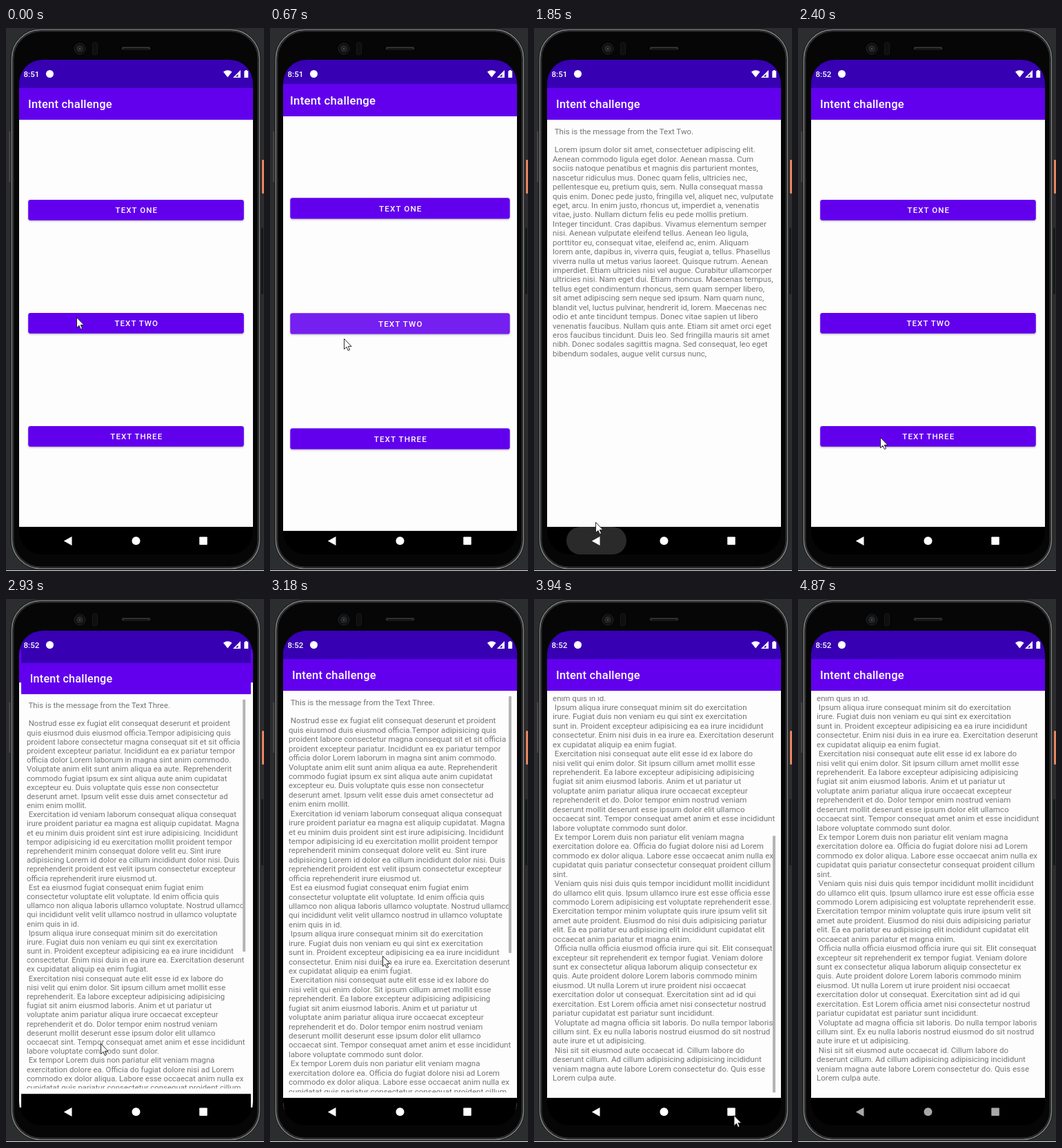
Animation, 374 px wide and 787 px high, one loop 4.97 s. Source, as an HTML page:

```html
<!DOCTYPE html>
<html lang="en">
<head>
<meta charset="utf-8">
<title>Intent challenge</title>
<style>
  html, body { margin: 0; width: 100%; height: 100%; overflow: hidden; background: #2c2d2f; }
  svg { display: block; width: 100%; height: 100%; }
  text { font-family: Roboto, sans-serif; white-space: pre; }
  .body { font-size: 11.57px; fill: #757575; }
  .title { font-size: 16.5px; font-weight: 500; letter-spacing: .22px; fill: #fff; }
  .label { font-size: 11.55px; font-weight: 500; letter-spacing: 1.03px; fill: #fff; text-anchor: middle; }
  .clock { font-size: 11.6px; font-weight: 500; fill: #fff; }
</style>
</head>
<body>
<svg viewBox="0 0 374 787">
  <defs>
    <clipPath id="screen"><rect x="19" y="46" width="339" height="717" rx="34"/></clipPath>
    <clipPath id="view"><rect x="19" y="141" width="339" height="574"/></clipPath>
    <filter id="lift" x="-5%" y="-30%" width="110%" height="170%">
      <feDropShadow dx="0" dy="1.2" stdDeviation=".9" flood-color="#000" flood-opacity=".28"/>
    </filter>
    <g id="chrome">
      <rect x="19" y="132" width="339" height="592" fill="#fdfdfd"/>
      <rect x="19" y="46" width="339" height="42" fill="#3700b3"/>
      <rect x="19" y="87" width="339" height="46" fill="#6200ee"/>
      <rect x="19" y="723" width="339" height="40"/>
      <text class="title" x="32" y="116">Intent challenge</text>
    </g>
  </defs>

  <rect width="374" height="787" fill="#2c2d2f"/>
  <rect x="371" y="191" width="3" height="49" rx="1" fill="#e5845e"/>
  <rect x="370" y="290" width="3" height="96" rx="1" fill="#17181a"/>
  <rect x="4.5" y="150" width="2" height="73" fill="#4a4b4d"/>
  <rect y="786" width="374" height="1" fill="#dcdcdc"/>
  <g fill="none">
    <rect x="7" y="1" width="362" height="784" rx="44" fill="#060606" stroke="#1a1b1c"/>
    <rect x="8.5" y="2.5" width="359" height="781" rx="42" stroke="#858688" stroke-width="1.6"/>
    <rect x="10.500" y="4.500" width="355" height="777" rx="40" stroke="#2c2d2e" stroke-width="2"/>
    <circle cx="107" cy="30" r="8" fill="#101112" stroke="#1e1f20"/>
    <circle cx="107" cy="30" r="4" fill="#1d1f22" stroke="#34363a"/>
    <circle cx="107" cy="30" r="1.2" fill="#4b4d52"/>
    <rect x="125.500" y="21" width="7" height="18" rx="3" fill="#0e0e0f" stroke="#18191a"/>
    <path d="M170 29.500H207" stroke="#3a3a3b" stroke-width="4" stroke-linecap="round"/>
    <path d="M171 30.500H206" stroke="#161616" stroke-width="3" stroke-linecap="round"/>
  </g>

  <g clip-path="url(#screen)">
    <rect x="19" y="46" width="339" height="717"/>
    <g id="menu"><use href="#chrome"/></g>
    <g id="reader">
      <use href="#chrome"/>
      <g clip-path="url(#view)"><g id="short"></g><g id="long"></g></g>
      <rect id="bar" x="346" width="4" height="372" fill="#b4b4b4"/>
    </g>

    <text id="clock" class="clock" x="25.500" y="71"></text>
    <g fill="#fff">
      <circle cx="63.500" cy="66.500" r="5.500"/>
      <path d="M315 63.500Q321.300 59 327.600 63.500L321.300 71.500Z"/>
      <path d="M340 61V72H329Z"/>
      <path d="M336.500 67V70.600H332.800Z" fill="#3700b3"/>
      <path d="M345.300 62.200H347V61H349.500V62.200H351.200V72H345.300Z"/>
    </g>
    <rect id="pill" y="723" height="40" rx="20" fill="#2a2a2a"/>
    <g id="nav" fill="#fff">
      <path d="M83.800 743.400L95.500 736.900V749.900Z"/>
      <circle cx="188.500" cy="743.300" r="6"/>
      <rect x="280.300" y="737.500" width="11.500" height="11.500" rx=".8"/>
    </g>
  </g>
  <path id="cursor" d="M.5 .5V15.500L4 12.300L6.300 17.500L8.600 16.500L6.300 11.400H11Z" fill="#fff" stroke="#15151c" stroke-width=".9"/>
</svg>

<script>
const LOOP = 4970, OPEN_A = 635, CLOSE = 1887, OPEN_B = 2792;
const LINE = 13.43, MID_X = 188.5, MID_Y = 404.5;

// The screen is refreshed only at these moments (ms).
const TICKS = [0, 130, 280, 400, 520, 670, 790, 910, 1060, 1210, 1330, 1730, 1850, 2000, 2140, 2260,
  2400, 2680, 2800, 2930, 3050, 3180, 3430, 3550, 3680, 3820, 3940, 4090, 4240, 4390, 4630, 4870];

// [time, x, y]
const POINTER = [[0, 102, 419], [130, 104, 421], [520, 104, 421], [670, 107, 450], [910, 122, 548],
  [1060, 110, 650], [1330, 88, 747], [1730, 88, 747], [1850, 89, 716], [2000, 96, 680], [2260, 116, 598],
  [2400, 119, 593], [2680, 119, 593], [2930, 137, 644], [3050, 146, 620], [3180, 163, 517],
  [3430, 185, 405], [3550, 190, 330], [3680, 192, 305], [3940, 289.5, 748], [4090, 290, 778]];
const SCROLL = [[3180, 0], [3430, 104.6], [3550, 215], [3680, 328.3]];

const SHORT = ` This is the message from the Text Two.

 Lorem ipsum dolor sit amet, consectetuer adipiscing elit.
Aenean commodo ligula eget dolor. Aenean massa. Cum
sociis natoque penatibus et magnis dis parturient montes,
nascetur ridiculus mus. Donec quam felis, ultricies nec,
pellentesque eu, pretium quis, sem. Nulla consequat massa
quis enim. Donec pede justo, fringilla vel, aliquet nec, vulputate
eget, arcu. In enim justo, rhoncus ut, imperdiet a, venenatis
vitae, justo. Nullam dictum felis eu pede mollis pretium.
Integer tincidunt. Cras dapibus. Vivamus elementum semper
nisi. Aenean vulputate eleifend tellus. Aenean leo ligula,
porttitor eu, consequat vitae, eleifend ac, enim. Aliquam
lorem ante, dapibus in, viverra quis, feugiat a, tellus. Phasellus
viverra nulla ut metus varius laoreet. Quisque rutrum. Aenean
imperdiet. Etiam ultricies nisi vel augue. Curabitur ullamcorper
ultricies nisi. Nam eget dui. Etiam rhoncus. Maecenas tempus,
tellus eget condimentum rhoncus, sem quam semper libero,
sit amet adipiscing sem neque sed ipsum. Nam quam nunc,
blandit vel, luctus pulvinar, hendrerit id, lorem. Maecenas nec
odio et ante tincidunt tempus. Donec vitae sapien ut libero
venenatis faucibus. Nullam quis ante. Etiam sit amet orci eget
eros faucibus tincidunt. Duis leo. Sed fringilla mauris sit amet
nibh. Donec sodales sagittis magna. Sed consequat, leo eget
bibendum sodales, augue velit cursus nunc,`;

const LONG = ` This is the message from the Text Three.

 Nostrud esse ex fugiat elit consequat deserunt et proident
quis eiusmod duis eiusmod officia.Tempor adipisicing quis
proident labore consectetur magna consequat sit et sit officia
proident excepteur pariatur. Incididunt ea ex pariatur tempor
officia dolor Lorem laborum in magna sint anim commodo.
Voluptate anim elit sunt anim aliqua ea aute. Reprehenderit
commodo fugiat ipsum ex sint aliqua aute anim cupidatat
excepteur eu. Duis voluptate quis esse non consectetur
deserunt amet. Ipsum velit esse duis amet consectetur ad
enim enim mollit.
 Exercitation id veniam laborum consequat aliqua consequat
irure proident pariatur ea magna est aliquip cupidatat. Magna
et eu minim duis proident sint est irure adipisicing. Incididunt
tempor adipisicing id eu exercitation mollit proident tempor
reprehenderit minim consequat dolore velit eu. Sint irure
adipisicing Lorem id dolor ea cillum incididunt dolor nisi. Duis
reprehenderit proident est velit ipsum consectetur excepteur
officia reprehenderit irure eiusmod ut.
 Est ea eiusmod fugiat consequat enim fugiat enim
consectetur voluptate elit voluptate. Id enim officia quis
ullamco non aliqua laboris ullamco voluptate. Nostrud ullamco
qui incididunt velit velit ullamco nostrud in ullamco voluptate
enim quis in id.
 Ipsum aliqua irure consequat minim sit do exercitation
irure. Fugiat duis non veniam eu qui sint ex exercitation
sunt in. Proident excepteur adipisicing ea ea irure incididunt
consectetur. Enim nisi duis in ea irure ea. Exercitation deserunt
ex cupidatat aliquip ea enim fugiat.
 Exercitation nisi consequat aute elit esse id ex labore do
nisi velit qui enim dolor. Sit ipsum cillum amet mollit esse
reprehenderit. Ea labore excepteur adipisicing adipisicing
fugiat sit anim eiusmod laboris. Anim et ut pariatur ut
voluptate anim pariatur aliqua irure occaecat excepteur
reprehenderit et do. Dolor tempor enim nostrud veniam
deserunt mollit deserunt esse ipsum dolor elit ullamco
occaecat sint. Tempor consequat amet anim et esse incididunt
labore voluptate commodo sunt dolor.
 Ex tempor Lorem duis non pariatur elit veniam magna
exercitation dolore ea. Officia do fugiat dolore nisi ad Lorem
commodo ex dolor aliqua. Labore esse occaecat anim nulla ex
cupidatat quis pariatur consectetur consequat proident cillum
sint.
 Veniam quis nisi duis quis tempor incididunt mollit incididunt
do ullamco elit quis. Ipsum ullamco irure est esse officia esse
commodo Lorem adipisicing est voluptate reprehenderit esse.
Exercitation tempor minim voluptate quis irure ipsum velit sit
amet aute proident. Eiusmod do nisi duis adipisicing pariatur
elit. Ea ea pariatur eu adipisicing elit incididunt cupidatat elit
occaecat anim pariatur et magna enim.
 Officia nulla officia eiusmod officia irure qui sit. Elit consequat
excepteur sit reprehenderit ex tempor fugiat. Veniam dolore
sunt ex consectetur aliqua laborum aliquip consectetur ex
quis. Aute proident dolore Lorem laboris commodo minim
eiusmod. Ut nulla Lorem ut irure proident nisi occaecat
exercitation dolor ut consequat. Exercitation sint ad id qui
exercitation. Est Lorem officia amet nisi consectetur nostrud
pariatur cupidatat est pariatur sunt incididunt.
 Voluptate ad magna officia sit laboris. Do nulla tempor laboris
cillum sint. Ex eu nulla laboris nostrud eiusmod do sit nostrud
aute irure et ut adipisicing.
 Nisi sit sit eiusmod aute occaecat id. Cillum labore do
deserunt cillum. Ad cillum adipisicing adipisicing incididunt
veniam magna aute labore Lorem consectetur do. Quis esse
Lorem culpa aute.`;

const $ = id => document.getElementById(id);
const clamp = v => Math.min(1, Math.max(0, v));
const ease = u => 1 - (1 - clamp(u)) ** 5;
const set = (el, attrs) => { for (const k in attrs) el.setAttribute(k, attrs[k]); };
const show = (el, on) => set(el, { display: on ? 'inline' : 'none' });

function add(parent, tag, attrs, content = '') {
  const el = document.createElementNS(parent.namespaceURI, tag);
  set(el, attrs);
  el.textContent = content;
  return parent.appendChild(el);
}

function along(keys, t) {
  const i = keys.findIndex(k => k[0] >= t);
  if (i < 0) return keys[keys.length - 1].slice(1);
  if (i === 0) return keys[0].slice(1);
  const a = keys[i - 1], b = keys[i], u = (t - a[0]) / (b[0] - a[0]);
  return a.slice(1).map((v, j) => v + (b[j + 1] - v) * u);
}

function fillText(group, message) {
  message.split('\n').forEach((line, i) =>
    add(group, 'text', { class: 'body', x: 27, y: 153.5 + i * LINE }, line));
}

function makeButton(label, y, pressAt, x) {
  const box = { x: 32.2, y: y + 0.1, width: 312.6, height: 29.7, rx: 3.3 };
  const clip = add($('menu'), 'clipPath', { id: 'clip' + y });
  add(clip, 'rect', box);
  add($('menu'), 'rect', { ...box, fill: '#6200ee', filter: 'url(#lift)' });
  const ripple = add($('menu'), 'circle', { cx: x, cy: y + 15, fill: '#fff', 'clip-path': `url(#clip${y})` });
  add($('menu'), 'text', { class: 'label', x: 189.3, y: y + 19.3 }, label);
  return t => {
    const age = t - pressAt;
    set(ripple, {
      r: age < 0 ? 0 : 30 + 215 * clamp(age / 260),
      opacity: 0.24 * clamp((540 - age) / 240)
    });
  };
}

function zoom(el, s, alpha) {
  set(el, { transform: `translate(${MID_X} ${MID_Y}) scale(${s}) translate(${-MID_X} ${-MID_Y})`, opacity: alpha });
  show(el, alpha > 0);
}

function drawWindows(t) {
  if (t < OPEN_A) {
    zoom($('menu'), 1, 1);
    zoom($('reader'), 1, 0);
    return;
  }
  const closing = t >= CLOSE && t < OPEN_B;
  const start = closing ? CLOSE : t < CLOSE ? OPEN_A : OPEN_B;
  const p = ease((t - start) / 400), fade = clamp((t - start - 35) / 50);
  zoom($('menu'), closing ? 1.05 - 0.05 * p : 1 + 0.05 * p, closing || p < 1 ? 1 : 0);
  zoom($('reader'), closing ? 1 - 0.15 * p : 0.85 + 0.15 * p, closing ? 1 - fade : fade);
}

fillText($('short'), SHORT);
fillText($('long'), LONG);
const buttons = [
  makeButton('TEXT ONE', 249, Infinity, MID_X),
  makeButton('TEXT TWO', 413, 250, 104),
  makeButton('TEXT THREE', 577, 2650, 119)
];

function draw(t) {
  drawWindows(t);
  buttons.forEach(b => b(t));

  const second = t >= OPEN_B, [scroll] = along(SCROLL, t);
  show($('short'), !second);
  show($('long'), second);
  set($('long'), { transform: `translate(0 ${-scroll})` });
  set($('bar'), { y: 141 + scroll * 0.616 });
  show($('bar'), second && t < 4240);

  $('clock').textContent = t < 2000 ? '8:51' : '8:52';
  const grow = clamp((t - 1650) / 200);
  set($('pill'), { x: 90.5 - 43.5 * grow, width: 87 * grow });
  show($('pill'), t >= 1730 && t < 2000);
  set($('nav'), { opacity: 1 - 0.34 * clamp((t - 4090) / 780) });

  const [x, y] = along(POINTER, t);
  set($('cursor'), { transform: `translate(${x} ${y})` });
  show($('cursor'), t < 4240);
}

const origin = performance.now();
function tick() {
  const t = (performance.now() - origin) % LOOP;
  draw(TICKS.filter(k => k <= t).pop() ?? 0);
  requestAnimationFrame(tick);
}
tick();
</script>
</body>
</html>
```
